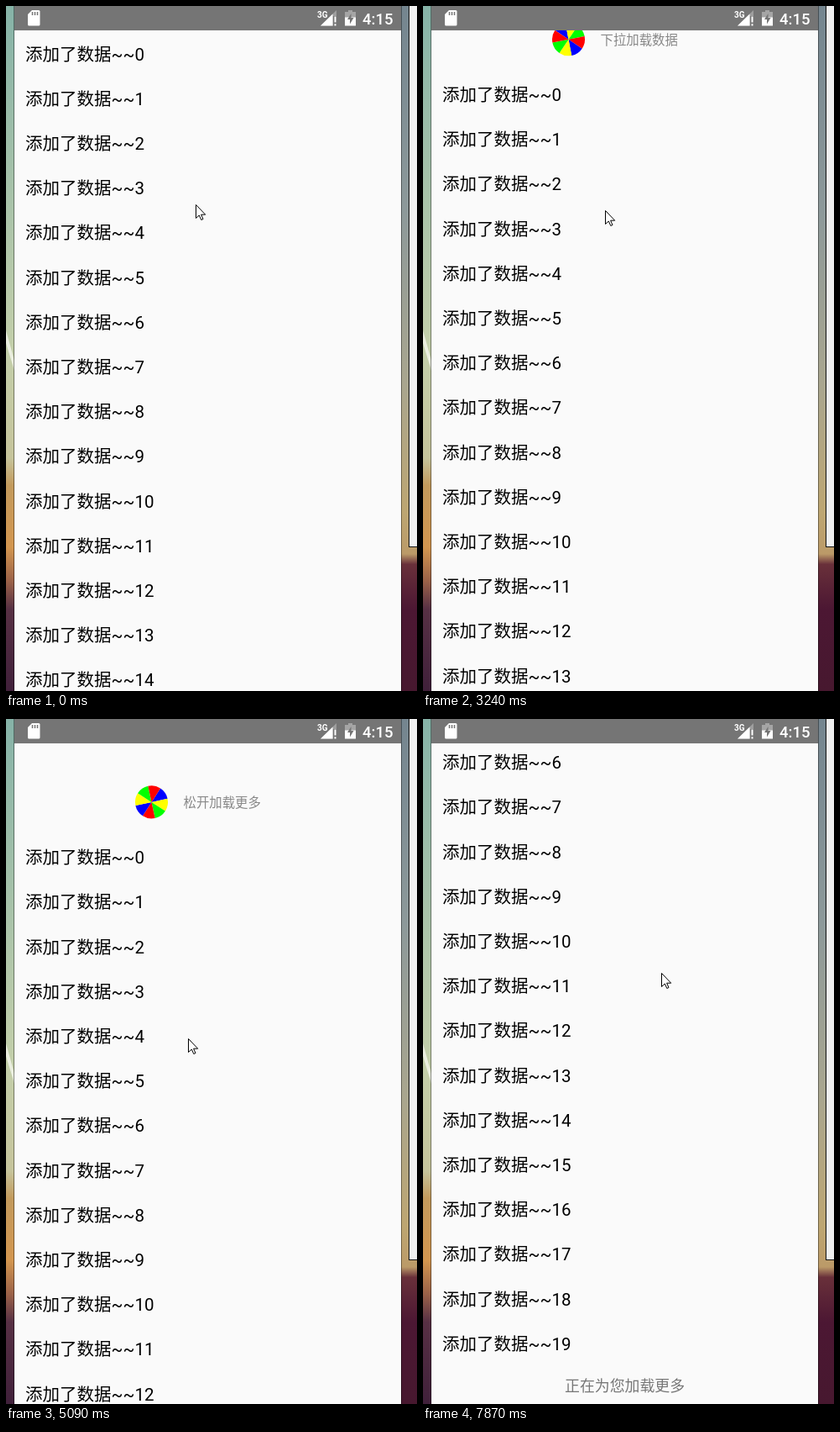
Recreate the animation shown at these times as an HTML page. Size 490 by 815 pixels, loop 8000 ms.

```html
<!DOCTYPE html>
<html lang="zh-CN">
<head>
<meta charset="utf-8">
<title>下拉加载</title>
<style>
  html, body { margin: 0; width: 100%; height: 100%; overflow: hidden; }
  svg { display: block; width: 490px; height: 815px; }
  text { font-family: Roboto, "Noto Sans CJK SC", "Noto Sans CJK", sans-serif; white-space: pre; }
  .row { font-size: 20.5px; fill: #000; }
  .hint { font-size: 15.4px; fill: #888; }
  .more { font-size: 17.9px; fill: #777; }
  .clock { font-size: 18.5px; font-weight: 500; fill: #fff; }
  .net { font-size: 10px; font-weight: 700; fill: #fff; }
</style>
</head>
<body>
<svg viewBox="0 0 490 815">
  <defs>
    <linearGradient id="left" x2="0" y2="1">
      <stop offset="0" stop-color="#86b3a8"/>
      <stop offset=".5" stop-color="#c3cfaa"/>
      <stop offset=".66" stop-color="#c6c49b"/>
      <stop offset=".7" stop-color="#c39a5c"/>
      <stop offset=".79" stop-color="#d3964f"/>
      <stop offset=".84" stop-color="#9a6148"/>
      <stop offset=".88" stop-color="#573044"/>
      <stop offset="1" stop-color="#40203a"/>
    </linearGradient>
    <linearGradient id="right" x2="0" y2="1">
      <stop offset="0" stop-color="#74858f"/>
      <stop offset=".3" stop-color="#8d999a"/>
      <stop offset=".55" stop-color="#a9a68f"/>
      <stop offset=".74" stop-color="#bda672"/>
      <stop offset=".8" stop-color="#bb9a68"/>
      <stop offset=".815" stop-color="#69303a"/>
      <stop offset=".88" stop-color="#4c1733"/>
      <stop offset="1" stop-color="#47182f"/>
    </linearGradient>
    <clipPath id="page"><path d="M10 29H471V815H10z"/></clipPath>
  </defs>

  <!-- desktop behind the phone -->
  <rect width="12" height="815" fill="url(#left)"/>
  <path d="M0 386L10 422V434L0 401z" fill="#f1f3e9" opacity=".85"/>
  <rect x="470" width="20" height="815" fill="url(#right)"/>
  <rect x="480.5" y="-1" width="12" height="644.5" fill="#f0f0f0" stroke="#111"/>
  <path d="M9.5 0V815M471.5 0V815" stroke="#000" opacity=".4"/>

  <rect x="10" width="461" height="815" fill="#fafafa"/>
  <g clip-path="url(#page)"><g id="list"></g></g>

  <!-- status bar -->
  <rect x="10" width="461" height="29" fill="#757575"/>
  <path d="M31 5H39a1.500 1.500 0 0 1 1.500 1.500V22a1.500 1.500 0 0 1-1.500 1.500H27.500A1.500 1.500 0 0 1 26 22V10z" fill="#fff"/>
  <path d="M31.500 7V11M34.500 7V11M37.500 7V11" stroke="#757575" stroke-width="1.500"/>
  <path d="M375 23.500L394 5V23.500z" fill="#fff" opacity=".3"/>
  <path d="M375 23.500L389.500 9.500V23.500z" fill="#fff"/>
  <path d="M390 12h5v12h-5z" fill="#757575"/>
  <path d="M391.500 12.500h2v7h-2zM391.500 21.300h2v2.200h-2z" fill="#fff"/>
  <text class="net" x="371" y="14">3G</text>
  <path d="M404 7h4V5h5v2h4v7H404z" fill="#fff" opacity=".35"/>
  <path d="M404 13.500h13V23.500H404z" fill="#fff"/>
  <path d="M411.500 9L407 16h3v5.500L414.500 14h-3z" fill="#757575"/>
  <text class="clock" x="425" y="21.500">4:15</text>

  <path id="cursor" d="M.5 .5V16.500L4.300 13L6.800 18.500L9 17.500L6.600 12.200H11.700z" fill="#fff" stroke="#000"/>
</svg>
<script>
const LOOP = 8000, STEP = 133.3, PITCH = 53.2;
const READY = 30, RELEASE = 43, RETURN = 47;   // phases of the pull, in steps
const list = document.getElementById('list');
const cursor = document.getElementById('cursor');

// Key points: [step, list offset]
const scroll = [[11, 0], [14, 11.4], [24, 48.4], [29, 66], [38, 107.5], [RELEASE, 107.5],
  [RELEASE + 1, 64.2], [RETURN, 64.2], [54.8, 0], [56, 0], [59, -324.6]];

// Key points: [step, x, y]
const pointer = [[0, 226, 236], [1, 234, 187], [3, 219, 157], [6, 219, 152], [9, 219, 119],
  [11, 219, 119], [14, 216, 146], [24, 217, 243], [29, 217, 284], [38, 217, 380],
  [54, 217, 381], [55, 249, 470], [57, 244, 360], [59, 284, 302]];

function add(parent, tag, attrs, text = '') {
  const el = document.createElementNS('http://www.w3.org/2000/svg', tag);
  for (const key in attrs) el.setAttribute(key, attrs[key]);
  el.textContent = text;
  return parent.appendChild(el);
}

function sample(keys, n, col = 1) {
  const i = keys.findIndex(k => k[0] > n);
  if (i === 0) return keys[0][col];
  if (i < 0) return keys[keys.length - 1][col];
  const a = keys[i - 1], b = keys[i];
  return a[col] + (b[col] - a[col]) * (n - a[0]) / (b[0] - a[0]);
}

// The wheel rolls with the pull, then spins half a turn while loading
function wheelAngle(n, offset) {
  if (n < RELEASE) return 1.5 * offset - 106;
  return 55 + 180 * Math.min(1, (n - RELEASE) / (RETURN - RELEASE));
}

function hintText(n) {
  if (n < READY || n > RETURN) return '下拉加载数据';
  return n < RELEASE ? '松开加载更多' : '正在加载数据';
}

const wheel = add(list, 'g', {});
const R = 19.5, half = Math.PI / 8;
const dx = (R * Math.sin(half)).toFixed(2), dy = (-R * Math.cos(half)).toFixed(2);
for (let i = 0; i < 8; i++) {
  add(wheel, 'path', {
    d: `M0 0L${-dx} ${dy}A${R} ${R} 0 0 1 ${dx} ${dy}z`,
    fill: ['#00f', '#ff0', '#0f0', '#f00'][i % 4],
    transform: `rotate(${i * 45})`
  });
}
const hint = add(list, 'text', { class: 'hint', x: 211.5, y: -2.7 });
for (let i = 0; i < 20; i++) {
  add(list, 'text', { class: 'row', x: 23, y: (64.6 + i * PITCH).toFixed(1) }, '添加了数据~~' + i);
}
add(list, 'text', { class: 'more', x: 169, y: 1125 }, '正在为您加载更多');

function draw(now) {
  const n = Math.floor(now % LOOP / STEP);
  const offset = sample(scroll, n);
  const x = Math.round(sample(pointer, n, 1)), y = Math.round(sample(pointer, n, 2));
  list.setAttribute('transform', `translate(0 ${offset})`);
  wheel.setAttribute('transform', `translate(173.5 -8.6) rotate(${wheelAngle(n, offset)})`);
  cursor.setAttribute('transform', `translate(${x} ${y})`);
  hint.textContent = hintText(n);
}

const start = performance.now();
function frame() {
  draw(performance.now() - start);
  requestAnimationFrame(frame);
}
frame();
</script>
</body>
</html>
```
